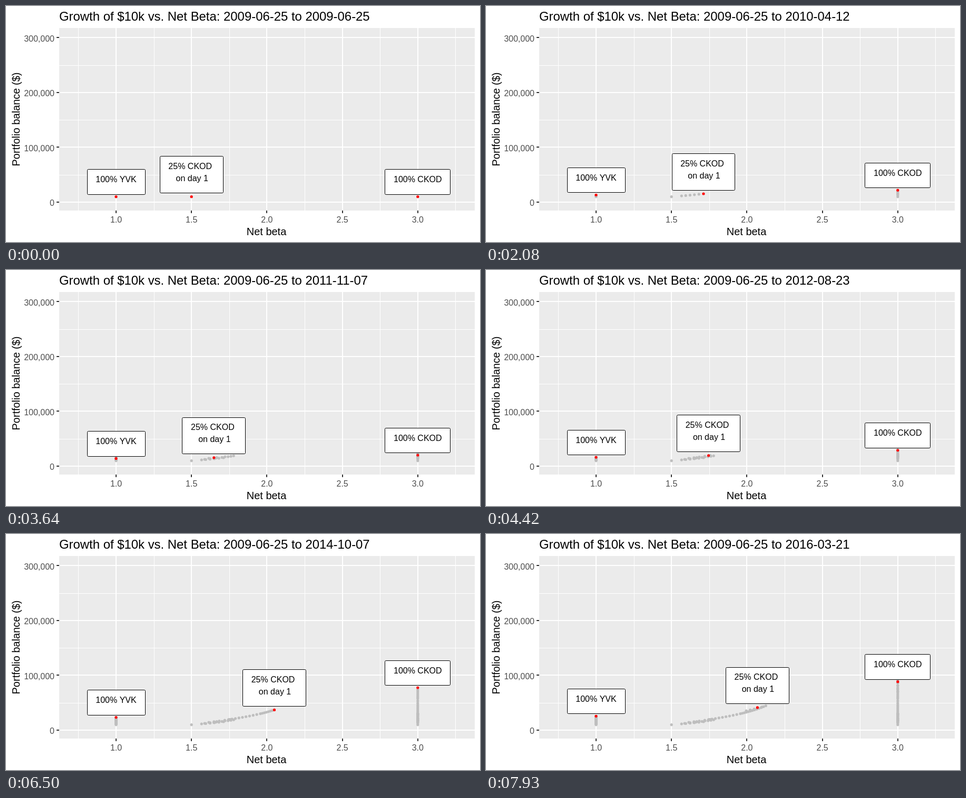
An HTML page with a canvas that plays this animation: 900x450 px, repeating every 8 s.

```html
<!DOCTYPE html>
<html lang="en">
<head>
<meta charset="utf-8">
<title>Growth vs. Net Beta</title>
<style>
  html, body { margin: 0; width: 100%; height: 100%; overflow: hidden; background: #fff; }
  canvas { display: block; }
</style>
</head>
<body>
<canvas id="chart" width="900" height="450"></canvas>
<script>
const ctx = document.getElementById('chart').getContext('2d');
const LOOP = 8000, HOLD = 1430, STEP = 130, DAYS_PER_STEP = 33.24;
const PANEL = { x: 101, y: 42, w: 789, h: 348 };
const xOf = beta => 209 + (beta - 1) * 286.4;
const yOf = balance => 374.1 - balance * 104.62 / 1e5;

// Turning points of the market: [step, growth of the plain fund, growth of the triple fund]
const turns = [
  [0, 1, 1], [1, 1.096, 1.3], [6, 1.32, 2.19], [8, 1.18, 1.47], [12, 1.45, 2.57],
  [14, 1.54, 2.95], [17, 1.33, 1.77], [21, 1.63, 2.98], [24, 1.626, 2.9], [33, 2.09, 5.75],
  [40, 2.34, 7.75], [45, 2.59, 10], [50, 2.37, 7.05], [51, 2.56, 8.83]
];

// Growth is exponential between two turning points
function growthAt(k, fund) {
  const i = Math.max(1, turns.findIndex(turn => turn[0] >= k));
  const from = turns[i - 1], to = turns[i];
  return from[fund] * (to[fund] / from[fund]) ** ((k - from[0]) / (to[0] - from[0]));
}

// The three portfolios at one step, as points on the stage
function portfolios(k) {
  const plain = growthAt(k, 1), triple = growthAt(k, 2);
  const mix = 0.75 * plain + 0.25 * triple;
  const beta = 0.75 * (plain + triple) / mix;
  return [[1, plain], [beta, mix], [3, triple]].map(([b, v]) => ({ x: xOf(b), y: yOf(v * 1e4) }));
}
const steps = Array.from({ length: 52 }, (_, k) => portfolios(k));

const isoDate = date => date.toISOString().slice(0, 10);

function goodFriday(year) {
  const moon = (19 * (year % 19) + 24) % 30;
  const sunday = (2 * (year % 4) + 4 * (year % 7) + 6 * moon + 5) % 7;
  return isoDate(new Date(Date.UTC(year, 2, 20 + moon + sunday)));
}

function isTradingDay(date) {
  const month = date.getUTCMonth() + 1, day = date.getUTCDate(), weekday = date.getUTCDay();
  const iso = isoDate(date), nth = Math.ceil(day / 7);
  const fixed = offset => [101, 704, 1225].includes(month * 100 + day + offset);
  if (weekday % 6 === 0 || iso === goodFriday(date.getUTCFullYear())) return false;
  if (/2012-10-(29|30)/.test(iso)) return false; // storm closure
  if (fixed(0) || weekday === 5 && fixed(1) || weekday === 1 && fixed(-1)) return false;
  if (weekday === 1 && (month < 3 && nth === 3 || month === 5 && day > 24 || month === 9 && nth === 1)) return false;
  return !(weekday === 4 && month === 11 && nth === 4);
}

const tradingDays = [];
for (const date = new Date('2009-06-25T00:00:00Z'); date.getUTCFullYear() < 2017; date.setUTCDate(date.getUTCDate() + 1))
  if (isTradingDay(date)) tradingDays.push(isoDate(date));

function text(string, x, y, size, align = 'center', color = '#000') {
  ctx.font = `${size}px "Liberation Sans", Arial, sans-serif`;
  ctx.textAlign = align;
  ctx.fillStyle = color;
  ctx.fillText(string, x, y);
}

function rect(color, x, y, w, h) {
  ctx.fillStyle = color;
  ctx.fillRect(x, y, w, h);
}

// First pixel of a line of the given width
const lineStart = (position, width) => Math.round(position) - (width >> 1);

function vertical(beta, width) {
  rect('#fff', lineStart(xOf(beta), width), PANEL.y, width, PANEL.h);
}

function horizontal(balance, width) {
  rect('#fff', PANEL.x, lineStart(yOf(balance), width), PANEL.w, width);
}

function drawAxes() {
  rect('#fff', 0, 0, 900, 450);
  rect('#ebebeb', PANEL.x, PANEL.y, PANEL.w, PANEL.h);
  for (let beta = 0.75; beta < 3.5; beta += 0.5) vertical(beta, 1);
  for (let balance = 5e4; balance < 3e5; balance += 1e5) horizontal(balance, 1);
  for (let beta = 1; beta <= 3; beta += 0.5) {
    const x = xOf(beta);
    vertical(beta, 2);
    rect('#333', lineStart(x, 2), 390, 2, 5);
    text(beta.toFixed(1), x, 413, 16, 'center', '#4d4d4d');
  }
  for (let balance = 0; balance <= 3e5; balance += 1e5) {
    const y = yOf(balance);
    horizontal(balance, 2);
    rect('#333', 96, lineStart(y, 2), 5, 2);
    text(balance.toLocaleString('en-US'), 92, Math.round(y + 7.3), 16, 'right', '#4d4d4d');
  }
  text('Net beta', 494.5, 437, 20);
  ctx.save();
  ctx.translate(26, 216);
  ctx.rotate(-Math.PI / 2);
  text('Portfolio balance ($)', 0, 0, 20);
  ctx.restore();
}

function dot({ x, y }, color) {
  ctx.fillStyle = color;
  ctx.beginPath();
  ctx.arc(x, y, 2.6, 0, 2 * Math.PI);
  ctx.fill();
}

// A box from `top` to `bottom` above its point; each line is [string, dx, dy]
function label(point, width, top, bottom, lines) {
  const snap = value => Math.floor(value) + 0.5;
  const x = snap(point.x - width / 2), y = snap(point.y - top);
  ctx.beginPath();
  ctx.roundRect(x, y, snap(point.x + width / 2) - x, snap(point.y - bottom) - y, 2);
  ctx.fillStyle = '#fff';
  ctx.fill();
  ctx.strokeStyle = '#000';
  ctx.lineWidth = 1;
  ctx.stroke();
  for (const [string, dx, dy] of lines) text(string, point.x + dx, Math.round(point.y + dy), 16);
}

function draw(time) {
  const k = time < HOLD ? 0 : 1 + Math.floor((time - HOLD) / STEP);
  const today = tradingDays[Math.round(k * DAYS_PER_STEP)];
  const [plain, mix, triple] = steps[k];
  drawAxes();
  text(`Growth of $10k vs. Net Beta: ${tradingDays[0]} to ${today}`, 101, 28, 23.9, 'left');
  steps.slice(0, k).flat().forEach(point => dot(point, '#bebebe'));
  steps[k].forEach(point => dot(point, '#f00'));
  label(plain, 110, 52, 4.4, [['100% YVK', 0, -27.5]]);
  label(mix, 119.8, 76.8, 7, [['25% CKOD', -2.5, -52.5], ['on day 1', 1, -29.5]]);
  label(triple, 124, 52, 4.4, [['100% CKOD', 0, -27.5]]);
}

const start = performance.now();
function tick() {
  draw((performance.now() - start) % LOOP);
  requestAnimationFrame(tick);
}
tick();
</script>
</body>
</html>
```
